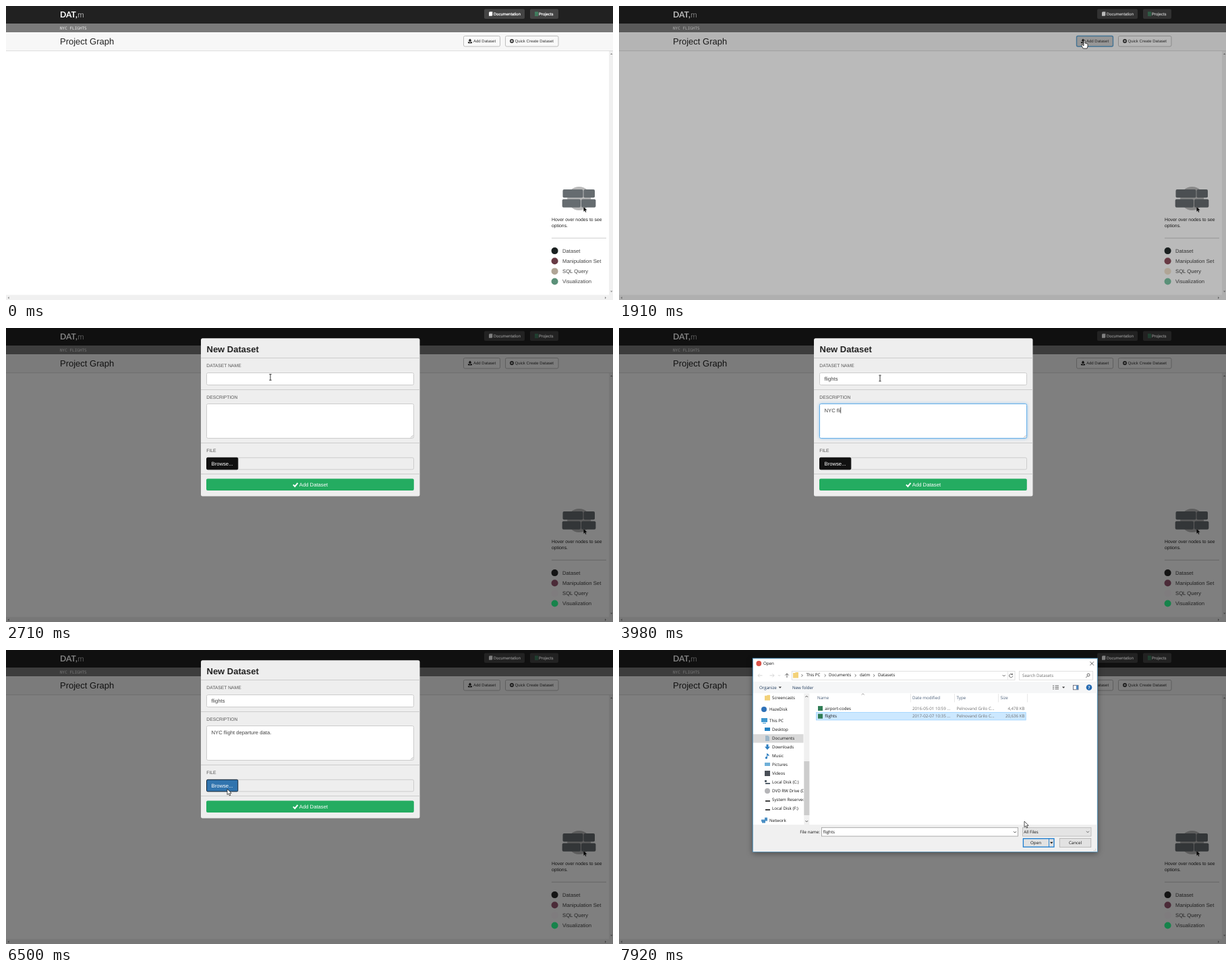
Recreate the animation shown at these times as an HTML page. Size 900x436 px, loop 8000 ms.

```html
<!DOCTYPE html>
<html lang="en">
<head>
<meta charset="utf-8">
<title>Project Graph</title>
<style>
html, body { margin: 0; width: 100%; height: 100%; overflow: hidden; background: #fff; }
svg { display: block; font-family: "Liberation Sans", Arial, sans-serif; text-rendering: geometricPrecision; }
text { white-space: pre; }
.small { font-size: 6.02px; fill: #333; }
.nav { font-size: 5.95px; fill: #fff; stroke: #fff; stroke-width: .2; }
.body { font-size: 7.7px; fill: #444; }
.label { font-size: 6.75px; fill: #555; }
.field { fill: #fff; stroke: #ccc; }
.field.on { stroke: #66afe9; filter: drop-shadow(0 0 2px rgba(102,175,233,.7)); }
.rule { stroke: #ccc; }
.btn { fill: #f9f9f9; stroke: #bdbdbd; }
#add.ring { stroke: #5a9cc9; stroke-width: 1.4; }
#add.down { fill: #cfcfcf; }
#browse.hot { fill: #3174ae; stroke: #123; }
.caret { stroke: #222; stroke-width: .7; }
#dialog { font: 6.2px "Open Sans", "Noto Sans", sans-serif; fill: #111; transform-origin: 454px 156px; filter: drop-shadow(0 2px 4px rgba(0,0,0,.4)); }
.line { fill: none; stroke: #444; stroke-width: .8; }
.box { fill: #fff; stroke: #d9d9d9; stroke-width: .8; }
.head { fill: #4c607a; }
.meta { fill: #6d6d6d; }

#veil, #modal, #dialog, #pointer { animation: 8s step-end infinite; }
#veil { animation-name: veil; }
#modal { animation-name: modal; }
#dialog { animation-name: dialog; }
#pointer { animation-name: pointer; }

@keyframes veil {
  0% { opacity: 0 }
  23.875% { opacity: .27 }
  25.375%, 100% { opacity: .5 }
}
@keyframes modal {
  0% { opacity: 0; transform: translateY(-54px) }
  25.375% { opacity: .36; transform: translateY(-39px) }
  26.875% { opacity: 1; transform: translateY(-9px) }
  28%, 100% { opacity: 1; transform: none }
}
@keyframes dialog {
  0% { opacity: 0; transform: scale(.96) }
  85.125% { opacity: .6; transform: scale(.97) }
  86.5%, 100% { opacity: 1; transform: none }
}
@keyframes pointer {
  0% { transform: translate(850px, 460px) }
  5% { transform: translate(876px, 490px); animation-timing-function: steps(6, start) }
  13.35% { transform: translate(672px, 82px); animation-timing-function: steps(2, start) }
  16.1% { transform: translate(690px, 51px) }
  26.875% { transform: translate(690px, 51px); animation-timing-function: steps(5, start) }
  33.875% { transform: translate(392px, 73px) }
  35.375% { transform: translate(387px, 74.5px) }
  67.375% { transform: translate(387px, 74.5px); animation-timing-function: steps(2, start) }
  70.6% { transform: translate(368px, 74px) }
  71.875% { transform: translate(368px, 74px); animation-timing-function: steps(8, start) }
  82.6% { transform: translate(328px, 206px) }
  88% { transform: translate(328px, 206px); animation-timing-function: steps(6, start) }
  96.5% { transform: translate(330px, 97px) }
  97.6% { transform: translate(330px, 97px); animation-timing-function: steps(2, start) }
  100% { transform: translate(601px, 254px) }
}
</style>
</head>
<body>
<svg width="900" height="436" viewBox="0 0 900 436">
  <defs>
    <path id="arrow" d="M0 0V8.6L2 6.8L3.4 10L4.9 9.3L3.5 6.3H6.2Z"/>
    <clipPath id="side"><rect x="198" y="65" width="75.5" height="194"/></clipPath>
  </defs>

  <!-- page -->
  <rect width="900" height="436" fill="#fff"/>
  <rect width="900" height="26" fill="#212121"/>
  <rect y="26" width="900" height="13" fill="#7a7a7a"/>
  <rect y="40" width="900" height="26" fill="#f7f7f7"/>
  <path d="M0 66.5H900" stroke="#ddd"/>
  <text x="80" y="17" fill="#fff" font-family="Lato, sans-serif" font-size="12.2" font-weight="700">DAT,<tspan font-weight="300">m</tspan></text>
  <text x="80" y="35" fill="#eee" font-family="DejaVu Sans Mono, monospace" font-size="6">NYC FLIGHTS</text>
  <text x="80" y="57" fill="#222" font-size="13">Project Graph</text>

  <g fill="#444">
    <rect x="709" y="4.5" width="60" height="14.5" rx="2"/>
    <rect x="777" y="4.5" width="42" height="14.5" rx="2"/>
  </g>
  <path d="M716 9.5L717 8.5H721.3V13.8L720.3 14.8H716Z" fill="#fff"/>
  <path d="M784 9.5H789.2M784 11.8H789.2M784 14.1H789.2" stroke="#3f9a6c" stroke-width="1.4"/>
  <text class="nav" x="723" y="13.8">Documentation</text>
  <text class="nav" x="790" y="13.8">Projects</text>

  <rect id="add" class="btn" x="678.5" y="44.5" width="54" height="15.5" rx="2"/>
  <rect class="btn" x="740.5" y="44.5" width="78.5" height="15.5" rx="2"/>
  <path d="M688 48.6L690.6 51.6H689V53H687V51.6H685.4ZM685 53H686.2V53.8H689.8V53H691V55.2H685Z" fill="#222"/>
  <text class="small" x="693" y="54.3">Add Dataset</text>
  <circle cx="750" cy="52" r="2.9" fill="#222"/>
  <path d="M748.3 52H751.7M750 50.3V53.7" stroke="#fff"/>
  <text class="small" x="754.5" y="54.3">Quick Create Dataset</text>

  <rect x="894" y="67" width="6" height="369" fill="#f0f0f0"/>
  <rect y="428.5" width="900" height="7.5" fill="#f0f0f0"/>
  <path d="M896 72L897.7 70L899.4 72ZM896 422.4L897.7 424.4L899.4 422.4ZM4.6 431L2.6 432.7L4.6 434.4ZM888 431L890 432.7L888 434.4Z" fill="#888"/>

  <circle cx="849.7" cy="285.5" r="17.5" fill="#b9b9b9"/>
  <g fill="#666c70">
    <rect x="825.5" y="272" width="30" height="12.2" rx="2"/>
    <rect x="856.5" y="272" width="16.5" height="12.2" rx="2"/>
    <rect x="824.7" y="286.4" width="27.3" height="12.4" rx="2"/>
    <rect x="853" y="286.4" width="21.4" height="12.4" rx="2"/>
  </g>
  <use href="#arrow" transform="translate(856.3 297.6) scale(.85)" fill="#000" stroke="#ddd" stroke-width=".4"/>
  <g font-size="6.85" fill="#222">
    <text x="809" y="319">Hover over nodes to see</text>
    <text x="809" y="328.3">options.</text>
  </g>
  <path d="M809 344.2H890" stroke="#ccc"/>
  <g class="body">
    <text x="825" y="365.6">Dataset</text>
    <text x="825" y="380.8">Manipulation Set</text>
    <text x="825" y="396">SQL Query</text>
    <text x="825" y="411.2">Visualization</text>
  </g>

  <rect id="veil" width="900" height="436"/>
  <g id="dots"></g>

  <!-- form -->
  <g id="modal">
    <rect x="289" y="15.3" width="324.5" height="234.3" rx="2.5" fill="#eee"/>
    <text x="297.5" y="35.5" font-size="13" font-weight="700" fill="#222">New Dataset</text>
    <path class="rule" d="M289 44.5H613.5M289 91.5H613.5M289 170.5H613.5M289 216.5H613.5"/>
    <text class="label" x="297.3" y="58">DATASET NAME</text>
    <text class="label" x="297.3" y="104.5">DESCRIPTION</text>
    <text class="label" x="297.3" y="183.5">FILE</text>
    <rect id="nameBox" class="field" x="297.5" y="66.5" width="307" height="18" rx="2"/>
    <rect id="descBox" class="field" x="297.5" y="112.5" width="307" height="51" rx="2"/>
    <path d="M600 162.5L603.5 159M602 162.5L603.5 161" stroke="#888" stroke-width=".6"/>
    <text id="name" class="body" x="304.5" y="78.3"></text>
    <text id="desc" class="body" x="304.5" y="124.7"></text>
    <line id="nameCaret" class="caret" y1="71" y2="80"/>
    <line id="descCaret" class="caret" y1="117.5" y2="126.5"/>
    <rect x="297.5" y="192.3" width="307" height="17.5" rx="2" fill="#eee" stroke="#ccc"/>
    <rect id="browse" x="297.5" y="192.3" width="46.3" height="17.5" rx="1.5" fill="#111" stroke="#111"/>
    <text class="body" x="304.5" y="203.7" style="fill:#fff">Browse...</text>
    <rect x="297" y="223.5" width="307.8" height="17.6" rx="2" fill="#24ac61"/>
    <path d="M425.8 232.4L428.3 235L432.5 229.8" fill="none" stroke="#fff" stroke-width="2"/>
    <text class="body" x="434.8" y="235.2" style="fill:#fff">Add Dataset</text>
  </g>

  <!-- file chooser -->
  <g id="dialog">
    <rect x="198.3" y="12.3" width="511" height="287" fill="#fff" stroke="#4a90bd" stroke-width=".9"/>
    <rect x="199" y="47" width="509.8" height="17" fill="#f5f6f7"/>
    <rect x="199" y="259" width="509.8" height="40" fill="#f0f0f0"/>
    <circle cx="207.3" cy="20" r="3.9" fill="#d9534a"/>
    <text x="214" y="22.4">Open</text>
    <path class="line" d="M698.5 17.3L704 22.8M704 17.3L698.5 22.8"/>
    <path class="line" style="stroke:#ccc" d="M212.5 37.8H206M208.5 35.3L206 37.8L208.5 40.3M223.5 37.8H230M227.5 35.3L230 37.8L227.5 40.3M236 37L237.5 38.5L239 37"/>
    <path class="line" d="M249 41V35M246.3 37.6L249 34.9L251.7 37.6" stroke-width="1"/>
    <rect class="box" x="256.3" y="31.5" width="330.7" height="12.8"/>
    <rect class="box" x="593.5" y="31.5" width="109" height="12.8"/>
    <path d="M258 34H261L262 33H266V41.5H258Z" fill="#f3d27a"/>
    <path class="line" d="M270.5 36L272.3 37.8L270.5 39.6M304.7 36L306.5 37.8L304.7 39.6M349.7 36L351.5 37.8L349.7 39.6M377.2 36L379 37.8L377.2 39.6M568.7 37L570.7 39L572.7 37M583 36.2A2.6 2.6 0 1 0 583.8 38.5M583.4 34.8V36.6H581.6"/>
    <path d="M576.5 32V44" stroke="#ddd" stroke-width=".7"/>
    <text x="277.5" y="39.4">This PC</text>
    <text x="311" y="39.4">Documents</text>
    <text x="357" y="39.4">datm</text>
    <text x="384" y="39.4">Datasets</text>
    <text class="meta" x="598" y="40">Search Datasets</text>
    <circle class="line" cx="696" cy="37" r="2"/><path class="line" d="M694.6 38.6L692.3 41"/>

    <g fill="#1e395b">
      <text x="208" y="57.8">Organize</text>
      <text x="257" y="57.8">New folder</text>
    </g>
    <path d="M236.6 54.4H241L238.8 56.8ZM657 54.4H661.2L659.1 56.8Z" fill="#333"/>
    <path class="line" d="M643 53H645M643 55.4H645M643 57.8H645M646.5 53H652M646.5 55.4H652M646.5 57.8H652"/>
    <rect x="673.5" y="52.3" width="7.5" height="6.5" fill="#fff" stroke="#556" stroke-width=".8"/>
    <rect x="678" y="52.5" width="3" height="6" fill="#4a86c0"/>
    <circle cx="697" cy="55.5" r="4.3" fill="#2268b0"/>
    <text x="697" y="57.8" text-anchor="middle" fill="#fff" font-weight="700">?</text>

    <rect x="199" y="124.8" width="74.5" height="12.8" fill="#d9d9d9"/>
    <g id="places" clip-path="url(#side)"></g>
    <rect x="274.3" y="64.5" width="8" height="194.5" fill="#f0f0f0"/>
    <rect x="274.3" y="165" width="8" height="80" fill="#cdcdcd"/>
    <path class="line" d="M276.4 70L278.3 68L280.2 70M276.4 253L278.3 255L280.2 253"/>

    <path d="M432.5 65V77.5M497.5 65V77.5M562.5 65V77.5M605.5 65V77.5" stroke="#e2e2e2" stroke-width=".8"/>
    <path class="line" d="M359.7 66.5L361.7 64.7L363.7 66.5" style="stroke:#888"/>
    <g class="head">
      <text x="294" y="73.4">Name</text>
      <text x="435" y="73.4">Date modified</text>
      <text x="500.5" y="73.4">Type</text>
      <text x="565.5" y="73.4">Size</text>
    </g>
    <rect id="picked" x="292.4" y="92.6" width="310.8" height="11.3" fill="#cce8ff" stroke="#99d1ff" stroke-width=".8"/>
    <g id="files"></g>

    <text x="268.3" y="272">File name:</text>
    <rect class="box" style="stroke:#999" x="300.5" y="263.3" width="291" height="12.8"/>
    <text id="fileName" x="302.5" y="272.2">flights</text>
    <rect x="598.5" y="263.3" width="101.5" height="12.8" fill="#e4e4e4" stroke="#b5b5b5" stroke-width=".8"/>
    <text x="600.3" y="272">All Files</text>
    <path class="line" d="M585 269L587 271L589 269M693 268.7L695 270.7L697 268.7"/>
    <rect x="599.4" y="279.7" width="45.6" height="12.4" fill="#e2e2e2" stroke="#1a7cd0" stroke-width="1.3"/>
    <path d="M637.5 280V292" stroke="#1a7cd0" stroke-width=".9"/>
    <path d="M639 284.8H643.6L641.3 287.3Z"/>
    <rect x="653.3" y="279.5" width="46.5" height="12.8" fill="#e2e2e2" stroke="#adadad" stroke-width=".8"/>
    <g text-anchor="middle">
      <text x="618" y="288.1">Open</text>
      <text x="676.5" y="288.1">Cancel</text>
    </g>
    <path d="M704 297.5H708M706 295.5H708" stroke="#bbb" stroke-dasharray="1 1"/>
  </g>

  <g id="pointer">
    <use id="arrowTip" href="#arrow" fill="#fff" stroke="#111" stroke-width=".7"/>
    <path id="handTip" d="M-1 0Q0-1 1 0V4L4.4 5Q5 5.2 5 6V9L4 12H-1.8L-4.4 7.6Q-4.6 6-3 6.4L-1 8Z" fill="#fff" stroke="#111" stroke-width=".8"/>
    <path id="beamTip" d="M-1.7-4.3H1.7M0-4.3V4.3M-1.7 4.3H1.7" fill="none" stroke="#222" stroke-width=".9"/>
  </g>
</svg>
<script>
const $ = id => document.getElementById(id);

const disk = "M1 5H8V7H1Z";
const screen = "M0 1H8V6H0Z";
const ball = "M0 4A4 4 0 1 0 8 4A4 4 0 1 0 0 4";
// label, centre y, indent, icon colour, icon shape
const places = [
  ["Screencasts", 70.7, 5, "#f3d27a", "M0 1H3L4 0H8V8H0Z"],
  ["HazeDisk", 88, 0, "#2f72b8", ball],
  ["This PC", 105, 0, "#3f97cf", "M0 0H9V6H0ZM2 7H7V8H2Z"],
  ["Desktop", 118, 5, "#2583c4", screen],
  ["Documents", 131, 5, "#9db7c9", "M1 0H5L7 2V8H1Z"],
  ["Downloads", 144, 5, "#2f7fc1", "M2.5 0H5.5V3.5H8L4 8L0 3.5H2.5Z"],
  ["Music", 157, 5, "#2f7fc1", "M3 0L6.5 2.5V4.5L4 3V7A1.6 1.6 0 1 1 3 5.5Z"],
  ["Pictures", 170, 5, "#6fb0d8", screen],
  ["Videos", 183, 5, "#4a4f57", "M0 0H8V8H0Z"],
  ["Local Disk (C:)", 196, 5, "#55606a", "M0 1H3V4H0ZM1 5H8V7H1Z"],
  ["DVD RW Drive (D:)", 209, 5, "#b5b5b8", ball],
  ["System Reserved", 222, 5, "#444", disk],
  ["Local Disk (F:)", 235, 5, "#444", disk],
  ["Network", 252.4, 0, "#4b8fc4", "M0 3H5V0H9V5H6V8H1V6H0Z"]
];
$("places").innerHTML = places.map(([label, y, dx, color, shape]) =>
  `<path d="${shape}" transform="translate(${211 + dx} ${y - 4})" fill="${color}"/>
   <text x="${223 + dx * .8}" y="${y + 2.2}">${label}</text>`).join("");

const files = [
  ["airport-codes", 86.6, "2016-05-01 10:59 ...", "4,478 KB"],
  ["flights", 98.2, "2017-02-07 10:35 ...", "20,636 KB"]
];
$("files").innerHTML = files.map(([name, y, date, size]) =>
  `<rect x="295" y="${y - 3.5}" width="7" height="7" fill="#2f7d55"/>
   <text x="305.3" y="${y + 2.2}">${name}</text>
   <g class="meta"><text x="435" y="${y + 2.2}">${date}</text>
   <text x="500.5" y="${y + 2.2}">Pelnovand Grilo C...</text>
   <text x="601.5" y="${y + 2.2}" text-anchor="end">${size}</text></g>`).join("");

// plain and dimmed legend colours
const tones = [["#1a2020", "#141414"], ["#683a44", "#4b2b38"], ["#b0a596", "#7f7c7e"], ["#5a9078", "#16834b"]];
const dots = tones.map((_, i) => {
  const dot = document.createElementNS("http://www.w3.org/2000/svg", "circle");
  dot.setAttribute("cx", 813.6);
  dot.setAttribute("cy", 363.1 + i * 15.15);
  dot.setAttribute("r", 5);
  $("dots").append(dot);
  return dot;
});

// value of the latest [time, value] pair reached
const at = (list, t) => list.reduce((value, [time, next]) => t >= time ? next : value, list[0][1]);
const show = (id, on) => { $(id).style.visibility = on ? "visible" : "hidden"; };

const tips = [[0, "arrow"], [1270, "hand"], [1980, "arrow"], [2590, "beam"], [5750, "arrow"], [5960, "beam"], [6280, "arrow"]];
const nameCount = [[0, 0], [2940, 2], [3040, 3], [3150, 5], [3250, 7]];
const descCount = [[0, 0], [3450, 2], [3570, 3], [3660, 4], [3980, 7], [4780, 21], [4870, 23], [4960, 26]];

function type(id, text, count, caretOn) {
  const el = $(id), part = text.slice(0, count), caret = $(id + "Caret");
  if (el.textContent !== part) el.textContent = part;
  const x = 304.8 + (count ? el.getComputedTextLength() : 0);
  caret.setAttribute("x1", x);
  caret.setAttribute("x2", x);
  show(id + "Caret", caretOn);
}

function draw(t) {
  const within = (a, b) => t >= a && t < b;
  const tip = at(tips, t);
  for (const kind of ["arrow", "hand", "beam"]) show(kind + "Tip", kind === tip);

  $("add").classList.toggle("down", within(1840, 2030));
  $("add").classList.toggle("ring", within(1840, 2590));
  dots.forEach((dot, i) => dot.setAttribute("fill", tones[i][t >= 2030 ? 1 : 0]));

  let count = at(descCount, t);
  if (within(3980, 4780)) count += Math.floor(Math.floor((t - 3980) / 100) * 1.75);
  type("name", "flights", at(nameCount, t), within(2830, 3350));
  type("desc", "NYC flight departure data.", count, within(3350, 5450));
  $("nameBox").classList.toggle("on", within(2830, 3350));
  $("descBox").classList.toggle("on", within(3350, 6490));
  $("browse").classList.toggle("hot", t >= 6490);

  show("picked", t >= 7720);
  show("fileName", t >= 7720);
}

const start = performance.now();
function tick() {
  draw((performance.now() - start) % 8000);
  requestAnimationFrame(tick);
}
tick();
</script>
</body>
</html>
```
